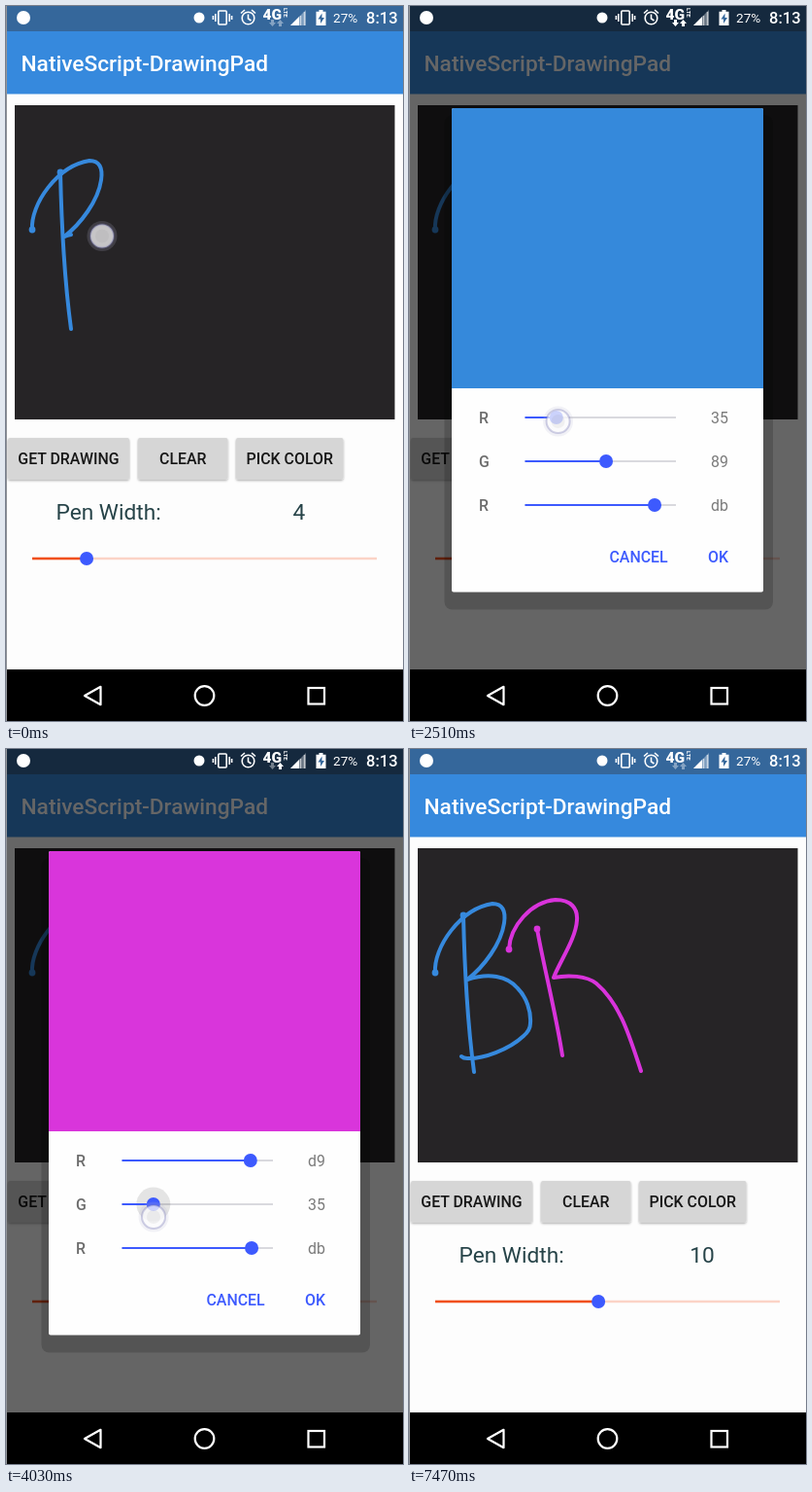
An HTML page for the animation above (8000 ms loop, 409 by 735 pixels).

```html
<!DOCTYPE html>
<html lang="en">
<head>
<meta charset="utf-8">
<title>Drawing pad</title>
<style>
  html, body { margin: 0; width: 100%; height: 100%; overflow: hidden; background: #fdfdfd; }
  svg { display: block; width: 100vw; height: 100vh; font-family: Roboto, sans-serif; }
  .medium { font-weight: 500; }
  .body { font-size: 15.9px; }
  .large { font-size: 22.7px; }
  .middle { text-anchor: middle; }
  .ink { fill: none; stroke-width: 4; stroke-linecap: round; stroke-linejoin: round; }
  .outline { fill: none; stroke: #fff; stroke-width: 2.2; }
</style>
</head>
<body>
<svg id="stage" viewBox="0 0 409 735">
  <defs>
    <filter id="lift" x="-10%" y="-20%" width="120%" height="150%">
      <feDropShadow dx="0" dy="1.3" stdDeviation="1" flood-opacity=".35"/>
    </filter>
    <filter id="raised" x="-10%" y="-20%" width="120%" height="160%">
      <feDropShadow dx="1" dy="3" stdDeviation="1.8" flood-opacity=".4"/>
    </filter>
  </defs>

  <rect width="409" height="735" fill="#fdfdfd"/>
  <rect width="409" height="26" fill="#35679b"/>
  <rect y="26" width="409" height="64.5" fill="#3689dd"/>
  <text class="medium large" x="15.5" y="67" fill="#fff">NativeScript-DrawingPad</text>
  <rect x="9" y="102" width="391.5" height="323" fill="#262426"/>
  <g id="drawing"></g>
  <g id="buttons"></g>
  <g class="large" fill="#264348">
    <text x="51.5" y="528">Pen Width:</text>
    <text id="penValue" class="middle" x="302" y="528"></text>
  </g>
  <path d="M27 568H382" stroke="#fbd3c6" stroke-width="2.4"/>
  <path id="penTrack" stroke="#f0501c" stroke-width="2.4"/>
  <circle id="penThumb" cy="568" r="7" fill="#3d5afe"/>

  <rect id="dim" width="409" height="682"/>

  <g id="dialog">
    <rect x="36.5" y="112" width="338.5" height="508.5" rx="8" fill-opacity=".17"/>
    <rect x="44" y="105" width="321" height="497.5" rx="2" fill="#fefefe"/>
    <path id="swatch" d="M44 393V107q0-2 2-2H363q2 0 2 2V393z"/>
    <g id="channels"></g>
    <g class="medium body" fill="#3d5afe">
      <text x="206.5" y="572">CANCEL</text>
      <text x="308" y="572">OK</text>
    </g>
  </g>

  <g id="status" fill="#fff">
    <circle cx="18" cy="12" r="7"/>
    <circle cx="199" cy="12" r="5.5"/>
    <g fill="none" stroke="#fff" stroke-width="1.6">
      <rect x="218.8" y="5" width="8.4" height="14" rx="1"/>
      <path d="M215.8 8v8M213.4 10v4M230.2 8v8M232.6 10v4"/>
      <circle cx="249.500" cy="12.500" r="6.300"/>
      <path d="M249.500 8.500v4.500l3 2M242 7.500l4-3.500M257 7.500l-4-3.500"/>
    </g>
    <text x="264.500" y="13.500" font-size="15.500" font-weight="900">4G</text>
    <text transform="translate(285.500 2) rotate(90)" font-size="6" font-weight="700">LTE</text>
    <path id="arrowDown" d="M273 14h3v3h2l-3.500 4l-3.500-4h2z"/>
    <path id="arrowUp" d="M281 21h3v-3h2l-3.500-4l-3.500 4h2z"/>
    <path d="M309 4V20H293z" fill-opacity=".35"/>
    <path d="M302 11V20H293z"/>
    <path d="M303.500 10V20M307.500 6V20" stroke="#fff" stroke-opacity=".6" stroke-width="1.500"/>
    <path d="M322.500 4h4v1.700h3V20H319.500V5.700h3z"/>
    <path d="M325.500 7.500l-4 6h2.500v4.500l4-6h-2.500z" fill="#35679b"/>
    <text x="337" y="17" font-size="13.600">27%</text>
    <text class="medium" x="371" y="18" font-size="16.500">8:13</text>
  </g>

  <rect y="682" width="409" height="53"/>
  <path class="outline" d="M81 709L97.500 699.800V718.200z" stroke-linejoin="round"/>
  <circle class="outline" cx="204.500" cy="709" r="9.800"/>
  <rect class="outline" x="311.500" y="701" width="16.500" height="16.500"/>
  <rect width="1" height="735" fill="#92959a"/>

  <g id="touch">
    <circle r="15.500" fill="#b9b9d0" fill-opacity=".18"/>
    <circle r="12" fill="#fff" fill-opacity=".7" stroke="#7a7ab8" stroke-opacity=".35" stroke-width="2"/>
    <circle r="7" fill="#888" fill-opacity=".1"/>
  </g>
</svg>

<script>
const LOOP = 8000;
const BLUE = '#3689dd', PINK = '#d933db';
const $ = id => document.getElementById(id);

function add(parent, tag, attrs, text = '') {
  const el = document.createElementNS('http://www.w3.org/2000/svg', tag);
  set(el, attrs);
  el.textContent = text;
  return parent.appendChild(el);
}
function set(el, attrs) {
  for (const name in attrs) el.setAttribute(name, attrs[name]);
}
function show(el, visible) {
  el.style.display = visible ? '' : 'none';
}

// Linear interpolation through [time, value] pairs, held at both ends.
function ramp(t, keys) {
  if (t <= keys[0][0]) return keys[0][1];
  for (let i = 1; i < keys.length; i++) {
    const [t0, v0] = keys[i - 1], [t1, v1] = keys[i];
    if (t < t1) return v0 + (v1 - v0) * (t - t0) / (t1 - t0);
  }
  return keys[keys.length - 1][1];
}

// The screen refreshes in bursts: [first, last, count].
const bursts = [
  [90, 440, 5], [710, 970, 4], [1340, 1340, 1], [1520, 1520, 1], [1700, 2240, 7],
  [2510, 3310, 10], [3400, 3490, 2], [3670, 4200, 7], [4650, 4920, 4], [5110, 5110, 1],
  [5390, 6190, 10], [6280, 6460, 3], [6830, 7470, 8]
];
const steps = [0];
for (const [first, last, count] of bursts)
  for (let i = 0; i < count; i++)
    steps.push(Math.round((first + (last - first) * i / Math.max(1, count - 1)) / 10) * 10);
const snap = t => steps.findLast(step => step <= t);

// Pen strokes; "keys" gives the drawn share over time.
const strokes = [
  { color: BLUE, d: 'M56 171C57 215 60 280 67 332' },
  { color: BLUE, d: 'M27 230C25 204 53 164 86 159C96 159 100 166 98 179C95 200 77 224 60 237' },
  { color: BLUE, d: 'M60 237C82 230 101 233 112 246C121 255 126 270 125 282Q125 289 118 295C103 309 76 319 60 318Q56 318 54 316',
    keys: [[0, .04], [350, 1]], from: 0, to: 440, lead: .18 },
  { color: PINK, d: 'M132 185C138 220 151 270 158 315',
    keys: [[5300, 0], [5570, 1]], from: 5390, to: 5660, lead: .15 },
  { color: PINK, d: 'M103 206C104 182 126 157 151 155C167 155 174 164 173 176C172 195 155 219 149 235C164 232 183 233 193 241C218 262 228 298 239 331',
    keys: [[5700, 0], [6370, 1]], from: 5740, to: 6460, lead: .1 }
];
for (const stroke of strokes) {
  stroke.group = add($('drawing'), 'g', {});
  stroke.path = add(stroke.group, 'path', { class: 'ink', d: stroke.d, stroke: stroke.color });
  stroke.length = stroke.path.getTotalLength();
  if (stroke !== strokes[2]) {
    const start = stroke.path.getPointAtLength(0);
    add(stroke.group, 'circle', { cx: start.x, cy: start.y, r: 3.4, fill: stroke.color });
  }
}

const buttons = [['GET DRAWING', 2, 127], ['CLEAR', 136, 228.500], ['PICK COLOR', 237, 347.500]]
  .map(([label, left, right]) => {
    const box = add($('buttons'), 'rect',
      { x: left, y: 444, width: right - left, height: 42.5, rx: 2, fill: '#d6d6d6', filter: 'url(#lift)' });
    add($('buttons'), 'text',
      { class: 'medium body middle', x: (left + right) / 2, y: 471, fill: '#161616' }, label);
    return box;
  });

const channelX = value => 119.500 + 155.500 * value / 255;
const channels = [['R', 423], ['G', 468], ['R', 513]].map(([label, y]) => {
  const g = add($('channels'), 'g', {});
  add(g, 'text', { class: 'medium body', x: 72, y: y + 6, fill: '#6c6c6c' }, label);
  add(g, 'path', { d: `M119.500 ${y}H275`, stroke: '#d9d9de', 'stroke-width': 2 });
  return {
    y,
    halo: add(g, 'circle', { cy: y, r: 17.5, fill: '#000', 'fill-opacity': .1 }),
    track: add(g, 'path', { stroke: '#3d5afe', 'stroke-width': 2.2 }),
    thumb: add(g, 'circle', { cy: y, r: 7, fill: '#3d5afe' }),
    value: add(g, 'text', { class: 'body middle', x: 320, y: y + 6, fill: '#7a7a7a' })
  };
});

const redKeys = [[2510, 53], [2600, 66], [2780, 145], [2960, 217]];
const greenKeys = [[3050, 137], [3140, 158], [3230, 175], [3310, 180], [3580, 180],
  [3670, 160], [3850, 90], [4030, 51]];
const penKeys = [[6830, 4], [7380, 10]];
const dimKeys = [[1610, 0], [1700, .12], [1880, .45], [1970, .6], [4560, .6],
  [4650, .53], [4740, .38], [4830, .19], [4920, .04], [5110, 0]];
const dialogKeys = [[1610, 0], [1700, .25], [1880, 1], [4560, 1], [4650, .55], [4740, .08], [4830, 0]];
const penX = value => 27 + 355 * (value - 1) / 19;

function touchPoint(t) {
  const stroke = strokes.find(s => s.keys && t >= s.from && t < s.to);
  if (stroke) {
    const share = Math.min(1, ramp(t, stroke.keys) + stroke.lead);
    return stroke.path.getPointAtLength(share * stroke.length);
  }
  if (t >= 2510 && t < 3040) return { x: channelX(ramp(t + 20, redKeys)), y: ramp(t, [[2510, 427], [2960, 432]]) };
  if (t >= 3130 && t < 4200)
    return { x: channelX(ramp(t, greenKeys)) + ramp(t, [[3230, 8.5], [3490, 6], [4030, 0]]),
             y: ramp(t, [[3230, 476], [4030, 481]]) };
  if (t >= 6830 && t < 7470) return { x: penX(ramp(t, penKeys)), y: 574 };
  return null;
}

function render(t) {
  for (const { group, path, length, keys } of strokes) {
    const share = keys ? ramp(t, keys) : 1;
    show(group, share > 0);
    set(path, { 'stroke-dasharray': `${share * length + .01} ${length * 2}` });
  }

  const pressed = t >= 1340 && t < 2240;
  set(buttons[2], { fill: pressed ? '#cac8cb' : '#d6d6d6', filter: `url(#${pressed ? 'raised' : 'lift'})` });

  const width = Math.round(ramp(t, penKeys));
  $('penValue').textContent = width;
  set($('penTrack'), { d: `M27 568H${penX(width)}` });
  set($('penThumb'), { cx: penX(width) });

  set($('dim'), { opacity: ramp(t, dimKeys) });
  const alpha = ramp(t, dialogKeys);
  const scale = t < 3000 ? .92 + .08 * alpha : 1;
  set($('dialog'), {
    opacity: alpha,
    transform: `translate(204.5 353.5) scale(${scale}) translate(-204.5 -353.5)`
  });
  show($('dialog'), alpha > 0);

  const rgb = [ramp(t, redKeys), ramp(t, greenKeys), 219].map(Math.round);
  set($('swatch'), { fill: `rgb(${rgb})` });
  channels.forEach(({ y, halo, track, thumb, value }, i) => {
    const x = channelX(rgb[i]);
    set(track, { d: `M119.500 ${y}H${x}` });
    set(thumb, { cx: x });
    set(halo, { cx: x });
    show(halo, i === 1 && t >= 3400 && t < 4200);
    value.textContent = rgb[i].toString(16).padStart(2, '0');
  });

  const active = t >= 1970 && t < 5110;
  set($('arrowUp'), { opacity: active ? 1 : .4 });
  set($('arrowDown'), { opacity: active && t < 2960 ? 1 : .4 });

  const point = touchPoint(t);
  show($('touch'), point);
  if (point) set($('touch'), { transform: `translate(${point.x} ${point.y})` });
}

const begin = performance.now();
function tick() {
  render(snap((performance.now() - begin) % LOOP));
  requestAnimationFrame(tick);
}
tick();
</script>
</body>
</html>
```
